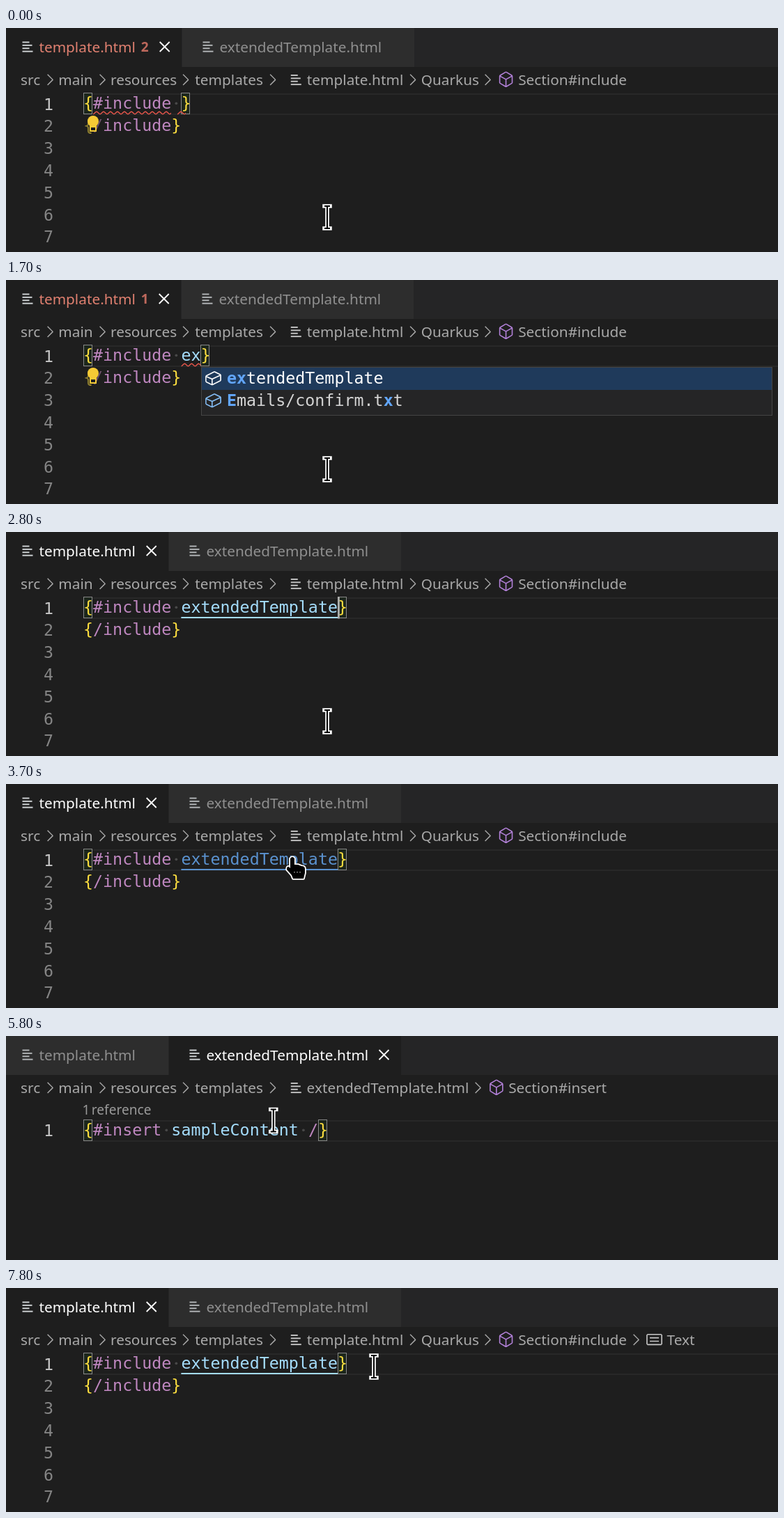
Write an HTML page with a canvas that moves like this. It is 1108 by 322 pixels and loops after 8 s.

```html
<!DOCTYPE html>
<html lang="en">
<head>
<meta charset="utf-8">
<title>Template editor</title>
<style>
html, body { margin: 0; height: 100%; overflow: hidden; background: #1e1e1e; }
canvas { display: block; }
</style>
</head>
<body>
<canvas width="1108" height="322"></canvas>
<script>
const ctx = document.querySelector('canvas').getContext('2d');
const LOOP = 8000, STEP = 100;
const LEFT = 111, CELL = 14.04, LINE = 31.8, TOP = 93;
const UI = '20.8px "Noto Sans", sans-serif';
const SMALL = '19.1px "Noto Sans", sans-serif';
const HOVER = '22.4px "Noto Sans", sans-serif';
const MONO = '23.32px "DejaVu Sans Mono", monospace';
const GOLD = '#fddf3f', KEYWORD = '#bf87c0', PARAM = '#a4dcfb', LINK = '#5a91ce';
const GREY = '#a9a9a9', RED = '#e5564b', PURPLE = '#b180d7';

// Icons on a 16 unit grid
const icons = {
  chevron: 'M10.07 8.02L5.7 3.67l.62-.62L11 7.72v.61L6.33 13l-.62-.62 4.36-4.36z',
  method: 'M13.51 4l-5-3h-1l-5 3-.49.86v6l.49.85 5 3h1l5-3 .49-.85v-6L13.51 4zm-6 9.56l-4.5-2.7V5.7l4.5 2.45v5.41zM3.27 4.7l4.74-2.84 4.74 2.84-4.74 2.59L3.27 4.7zm9.74 6.16l-4.5 2.7V8.15l4.5-2.45v5.16z',
  field: 'M14.45 4.5l-5-2.5h-.9l-7 3.5-.55.89v4.5l.55.9 5 2.5h.9l7-3.5.55-.9v-4.5l-.55-.89zm-8 8.64l-4.5-2.25V7.17l4.5 2v3.97zm.5-4.8L2.29 6.23l6.66-3.34 4.67 2.34-6.67 3.11zm7 1.55l-6.5 3.25V9.21l6.5-3v3.68z',
  constant: 'M4 6h8v1H4zM4 9h8v1H4zM1 4l1-1h12l1 1v8l-1 1H2l-1-1zm1 0v8h12V4z'
};
const hand = new Path2D('M-3 1Q0-3 3 1V10H8L13 12Q18 12 18 16V22L16 30H1L-1 25L-8 17Q-8 12-5 13L-3 15Z');
const beam = new Path2D('M-4-16H4M0-16V16M-4 16H4');

// Pointer moves: start, end, target x, target y, vertical bend
const moves = [
  [3000, 3600, 410, 108, 1],
  [4800, 5300, 542, 146, 1],
  [5500, 6200, 140, 26, 1.7],
  [6600, 7300, 528, 113, 1]
];
// Times at which the text caret flips, starting hidden
const caretFlips = [200, 1500, 1800, 2300, 2800, 3300, 3900, 4800, 5300, 5800, 6300, 7100, 7300, 7800];

function rect(x, y, w, h, color) {
  ctx.fillStyle = color;
  ctx.fillRect(x, y, w, h);
}

function frame(x, y, w, h, fill, border) {
  rect(x, y, w, h, fill);
  ctx.strokeStyle = border;
  ctx.lineWidth = 1;
  ctx.strokeRect(x + .5, y + .5, w - 1, h - 1);
}

function text(str, x, y, color, font = UI) {
  ctx.font = font;
  ctx.fillStyle = color;
  ctx.fillText(str, x, y);
}

function icon(name, x, y, color, scale = 1.63) {
  ctx.save();
  ctx.translate(x, y);
  ctx.scale(scale, scale);
  ctx.fillStyle = color;
  ctx.fill(new Path2D(icons[name]), 'evenodd');
  ctx.restore();
}

function fileIcon(x, y, color) {
  [10, 14, 10, 15].forEach((w, i) => rect(x + .5, y + i * 4.4, w, 1.9, color));
}

function cross(x, y) {
  ctx.strokeStyle = '#fff';
  ctx.lineWidth = 1.8;
  ctx.beginPath();
  for (const d of [-7, 7]) {
    ctx.moveTo(x - 7, y - d);
    ctx.lineTo(x + 7, y + d);
  }
  ctx.stroke();
}

function squiggle(from, to, y) {
  ctx.save();
  ctx.beginPath();
  ctx.rect(from, y - 4, to - from, 8);
  ctx.clip();
  ctx.strokeStyle = RED;
  ctx.lineWidth = 1.5;
  ctx.beginPath();
  for (let x = from; x <= to + 1; x++) ctx.lineTo(x, y + 1.7 * Math.cos((x - from) * Math.PI / 5));
  ctx.stroke();
  ctx.restore();
}

const colX = col => LEFT + col * CELL;

function drawTab(x, width, name, active, color) {
  rect(x, 0, width, 56, active ? '#1e1e1e' : '#2d2d2d');
  fileIcon(x + 29, 19.5, active ? '#d0d4d6' : '#b4b7b9');
  text(name, x + 53.4, 35, color);
}

function drawTabs(second, errors) {
  const edge = errors === 2 ? 252 : errors ? 251 : 233;
  rect(0, 0, 1108, 56, '#252526');
  drawTab(-6, edge + 6, 'template.html', !second, second ? '#8f8f8f' : errors ? '#e08070' : '#fff');
  drawTab(edge + 1, 333, 'extendedTemplate.html', second, second ? '#fff' : '#8f8f8f');
  if (errors) text(errors, 193.8, 34, '#bd685c', '600 ' + SMALL);
  cross(second ? 542.5 : edge - 24.3, 27);
}

function drawBreadcrumbs(second, atText) {
  const chevron = x => icon('chevron', x - 9.2, 61.3, GREY);
  [['src', 21], ['main', 75.3], ['resources', 150], ['templates', 271.3]].forEach(([s, x]) => text(s, x, 82, GREY));
  [59, 134, 253.5, 378.5].forEach(chevron);
  fileIcon(408.3, 67, '#c5c5c5');
  if (second) {
    text('extendedTemplate.html', 431.6, 82, GREY);
    chevron(673);
    icon('method', 690.8, 61, PURPLE);
    text('Section#insert', 721.2, 82, GREY);
    return;
  }
  text('template.html', 431.8, 82, GREY);
  chevron(579.5);
  text('Quarkus', 595.7, 82, GREY);
  chevron(687);
  icon('method', 704.5, 61, PURPLE);
  text('Section#include', 735.2, 82, GREY);
  if (atText) {
    chevron(900);
    icon('constant', 917.5, 61, '#c8c8c8');
    text('Text', 948.6, 82, GREY);
  }
}

// Draws [string, color] runs; a null color marks a visible blank
function drawCode(runs, top) {
  let col = 0;
  for (const [str, color] of runs) {
    if (color) text(str, colX(col), Math.round(top + 23), color, MONO);
    else {
      ctx.fillStyle = '#484848';
      ctx.beginPath();
      ctx.arc(colX(col + .5), top + 15.3, 1.9, 0, 7);
      ctx.fill();
    }
    col += str.length;
  }
}

function drawCurrentLine(top, lastCol) {
  rect(LEFT, top + 1, 1108 - LEFT, 2, '#282828');
  rect(LEFT, top + 30, 1108 - LEFT, 2, '#282828');
  for (const col of [0, lastCol]) frame(Math.round(colX(col)), top, 13, 31, '#1c261c', '#888');
}

function drawBulb() {
  rect(113, 126, 24, 25, 'rgba(30,30,30,.5)');
  ctx.fillStyle = '#f6ca35';
  ctx.beginPath();
  ctx.arc(125, 134, 8, 0, 7);
  ctx.fill();
  rect(120, 139, 10, 10, '#f6ca35');
  rect(122, 143, 6, 4, '#1e1e1e');
}

function drawSuggestions() {
  frame(280, 125, 820, 70, '#252526', '#454545');
  rect(281, 126, 818, 32, '#1f3a5b');
  const bold = 'bold ' + MONO, x = 317, match = '#62a6fb';
  icon('field', 284.5, 128, '#fff');
  text('ex', x, 149, match, bold);
  text('tendedTemplate', x + 2 * CELL, 149, '#fff', MONO);
  icon('field', 284.5, 160, '#84bdf5');
  text('E', x, 181, match, bold);
  text('mails/confirm.t', x + CELL, 181, '#d4d4d4', MONO);
  text('x', x + 16 * CELL, 181, match, bold);
  text('t', x + 17 * CELL, 181, '#d4d4d4', MONO);
}

function drawTooltip() {
  frame(251, 45, 267, 48, '#252526', '#454545');
  text('Follow link', 266, 77, '#3794ff', HOVER);
  const width = ctx.measureText('Follow link').width;
  text(' (ctrl + click)', 266 + width, 77, '#ccc', HOVER);
}

function drawInclude(t) {
  const name = 'extendedTemplate'.slice(0, t < 800 ? 0 : t < 1000 ? 1 : t < 1800 ? 2 : 16);
  const end = 10 + name.length;
  const linked = t >= 3700 && t < 4000;
  const nameColor = linked ? LINK : PARAM;
  drawCurrentLine(TOP, end);
  for (let i = 0; i < 8; i++) text(i + 1, 54, TOP + 24.5 + i * LINE, i ? '#858585' : '#c6c6c6', MONO);
  drawCode([['{', GOLD], ['#include', KEYWORD], [' ', null], [name, nameColor], ['}', GOLD]], TOP);
  drawCode([['{', GOLD], ['/include', KEYWORD], ['}', GOLD]], TOP + LINE);
  if (t < 1500) squiggle(125, 237, 122);
  if (t < 800) squiggle(246, 258, 122);
  else if (t < 2400) squiggle(colX(10), colX(end), 122);
  if (t >= 2800) rect(colX(10), 122, colX(end) - colX(10), 2, nameColor);
  if (t < 1300 || t >= 1600 && t < 2100) drawBulb();
  if (t >= 1000 && t < 1800) drawSuggestions();
  if (t >= 3900 && t < 4000) drawTooltip();
  return colX(t >= 7300 ? end + 1 : end);
}

function drawInsert() {
  const top = TOP + 27;
  text('1', 109.5, 113, '#999', SMALL);
  text('reference', 122.8, 113, '#999', SMALL);
  drawCurrentLine(top, 24);
  text(1, 54, top + 24, '#c6c6c6', MONO);
  drawCode([['{', GOLD], ['#insert', KEYWORD], [' ', null], ['sampleContent', PARAM],
    [' ', null], ['/', KEYWORD], ['}', GOLD]], top);
  return LEFT;
}

function pointerAt(t) {
  let x = 461, y = 272;
  for (const [start, end, toX, toY, bend] of moves) {
    const p = Math.min(1, Math.max(0, (t - start) / (end - start)));
    const eased = p * p * (3 - 2 * p);
    x += (toX - x) * eased;
    y += (toY - y) * eased ** bend;
  }
  return [x, y];
}

function drawPointer(t) {
  const [x, y] = pointerAt(t);
  const stroke = (path, color, width) => {
    ctx.strokeStyle = color;
    ctx.lineWidth = width;
    ctx.stroke(path);
  };
  ctx.save();
  ctx.translate(x, y);
  if (y < 90 || t >= 3700 && t < 4000) {
    ctx.translate(1, -2);
    ctx.lineJoin = 'round';
    stroke(hand, '#fff', 3.6);
    ctx.fillStyle = '#000';
    ctx.fill(hand);
    for (const dx of [2, 6, 10]) rect(dx, 20, 2, 1.5, '#777');
  } else {
    ctx.lineCap = 'square';
    stroke(beam, '#fff', 5.5);
    ctx.lineCap = 'butt';
    stroke(beam, '#000', 2);
  }
  ctx.restore();
}

function draw(now) {
  const t = Math.floor(now % LOOP / STEP) * STEP;
  const second = t >= 4300 && t < 6600;
  const errors = t < 1500 ? 2 : t < 2300 ? 1 : 0;
  rect(0, 0, 1108, 322, '#1e1e1e');
  drawTabs(second, errors);
  drawBreadcrumbs(second, t >= 7400);
  const caretX = second ? drawInsert() : drawInclude(t);
  if (caretFlips.filter(flip => flip <= t).length % 2) {
    rect(caretX, second ? TOP + 27 : TOP, 2.8, 31.5, '#aeafad');
  }
  drawPointer(t);
  requestAnimationFrame(draw);
}
requestAnimationFrame(draw);
</script>
</body>
</html>
```
